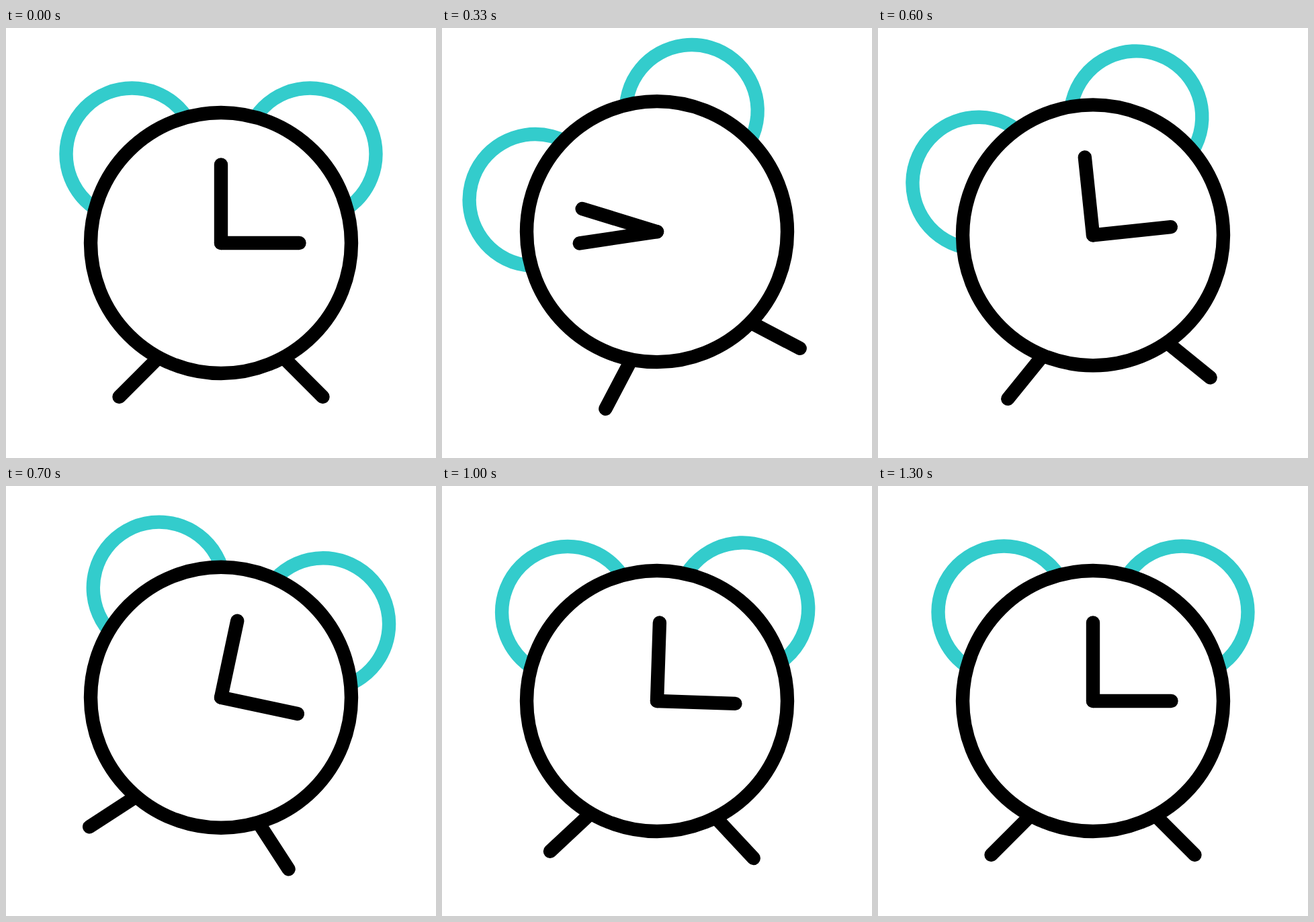
Animation of 640 by 640 pixels, one loop 1.67 s. Source, as an HTML page:

```html
<!DOCTYPE html>
<html lang="en">
<head>
<meta charset="utf-8">
<title>Ringing alarm clock</title>
<style>
  html, body { margin: 0; width: 100%; height: 100%; overflow: hidden; background: #fff; }
  svg { display: block; width: 100vw; height: 100vh; }
</style>
</head>
<body>
<svg viewBox="0 0 640 640" fill="none" stroke="#000" stroke-width="20.4" stroke-linecap="round">
  <!-- everything turns about the centre of the dial -->
  <g id="clock">
    <g stroke="#33cccc">
      <circle id="bellL" cx="-132.5" cy="-132.5" r="98"/>
      <circle id="bellR" cx="132.5" cy="-132.5" r="98"/>
    </g>
    <path id="legs" d="M-151.5 229L-92 169.5M151.5 229L92 169.5"/>
    <circle r="194" fill="#fff"/>
    <path id="minute" d="M0 0V-116.5"/>
    <path id="hour" d="M0 0H116.5"/>
  </g>
</svg>
<script>
  const LOOP = 1670, STEP = 1000 / 30;
  const $ = id => document.getElementById(id);
  const smooth = p => p * p * (3 - 2 * p);
  const soft = p => 0.72 * smooth(p) + 0.28 * p;
  const late = p => smooth(p + 0.24 * p * p * (1 - p));

  // Keys are [step, value]; the value is held before the first and after the last.
  function track(keys, ease) {
    return f => {
      if (f <= keys[0][0]) return keys[0][1];
      for (let i = 1; i < keys.length; i++) {
        const [a, from] = keys[i - 1], [b, to] = keys[i];
        if (f < b) return from + (to - from) * ease((f - a) / (b - a));
      }
      return keys[keys.length - 1][1];
    };
  }

  const lift = track([[0.5, 0], [12.5, -19], [25.5, 0]], smooth);
  const sway = track([[0, 0], [15, -24], [21, 12], [26, -8], [30.5, 2.5], [36, 0]], soft);
  const swingL = track([[0.3, 0], [16.3, -20.5], [22.8, 10], [27.7, -7], [32.2, 2.5], [37.5, 0]], soft);
  const swingR = track([[1, 0], [17.3, -20.5], [23.9, 10], [28.4, -7], [33, 2.5], [38.7, 0]], soft);
  const minute = track([[1, 0], [14, 360]], smooth);
  const hour = track([[0.9, 0], [18, 360]], late);

  const turn = (id, deg) => $(id).setAttribute("transform", `rotate(${deg.toFixed(3)})`);

  function draw(ms) {
    const f = Math.floor((ms % LOOP + 3.4) / STEP);
    const tilt = sway(f);
    $("clock").setAttribute("transform", `translate(320 ${(320 + lift(f)).toFixed(3)})`);
    turn("legs", tilt);
    turn("bellL", tilt + swingL(f));
    turn("bellR", tilt + swingR(f));
    turn("minute", tilt + minute(f));
    turn("hour", tilt + hour(f));
  }

  const start = performance.now();
  function tick() {
    draw(performance.now() - start);
    requestAnimationFrame(tick);
  }
  tick();
</script>
</body>
</html>
```
